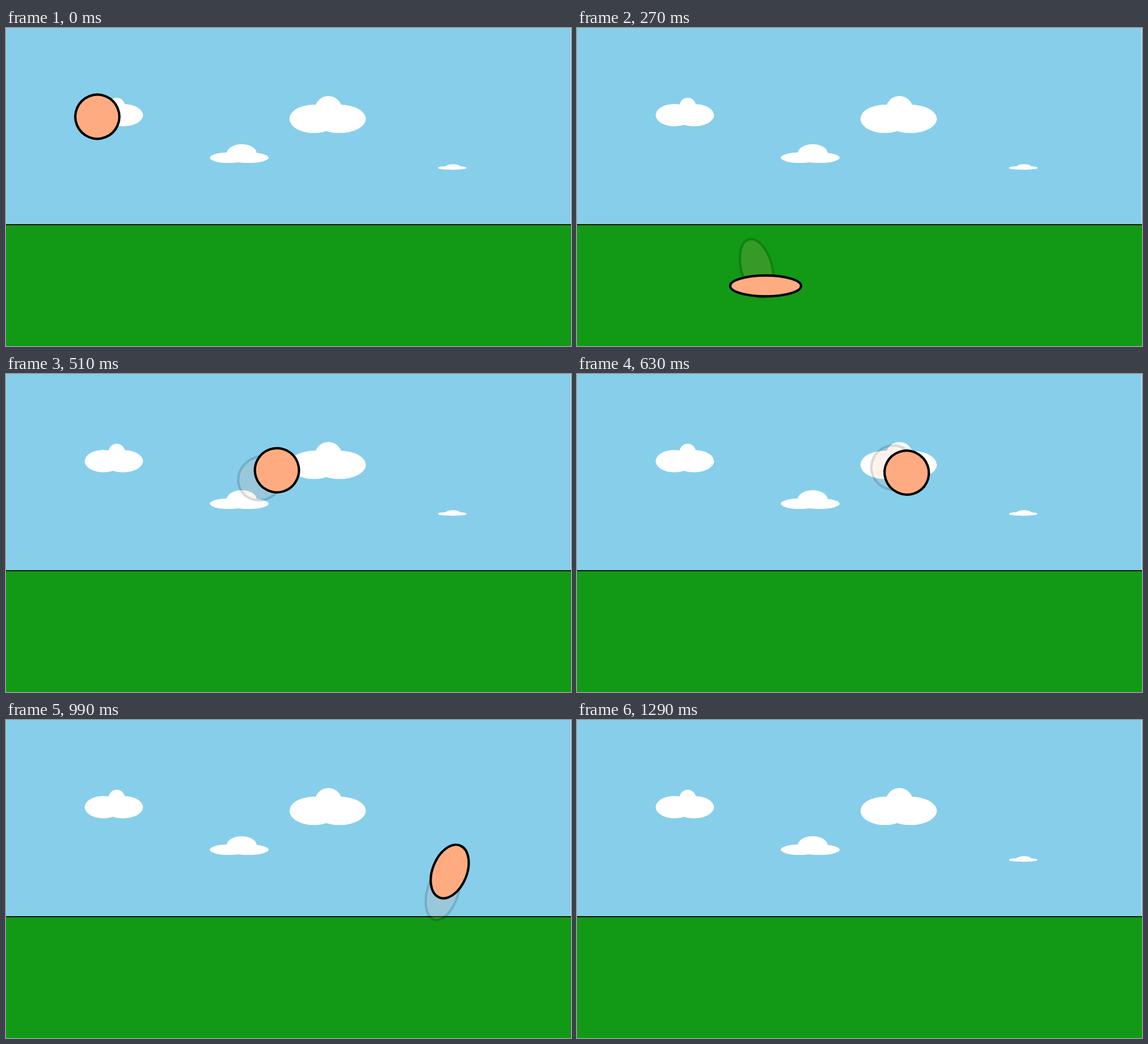
Recreate the animation shown at these times as an HTML page. Size 998 by 561 pixels, loop 1500 ms.

```html
<!DOCTYPE html>
<html lang="en">
<head>
<meta charset="utf-8">
<title>Bouncing ball</title>
<style>
  html, body { margin: 0; width: 100%; height: 100%; overflow: hidden; background: #fff; }
  svg { display: block; width: 998px; height: 561px; }
</style>
</head>
<body>
<svg viewBox="0 0 998 561">
  <rect width="997.5" height="347" fill="#87ceeb"/>
  <rect y="347" width="998" height="214" fill="#129916"/>
  <path d="M0 346.8H998" stroke="#000" stroke-width="1.8"/>
  <g id="clouds" fill="#fff"></g>
  <g fill="#ffab81" stroke="#000" stroke-width="4.2">
    <ellipse id="trail" opacity=".15"/>
    <ellipse id="ball"/>
  </g>
</svg>
<script>
const LOOP = 1500, STEP = 30, STROKE = 4.2, RADIUS = 41, LAST = 42;
const $ = id => document.getElementById(id);

const puff = (cx, cy, rx, ry) =>
  `<ellipse cx="${cx}" cy="${cy}" rx="${rx}" ry="${ry}"/>`;

// Two overlapping puffs side by side with a third as the head
function cloud(left, y, width, height, ...head) {
  const a = width * 0.32, b = width * 0.345;
  $('clouds').innerHTML += puff(left + a, y, a, height) +
    puff(left + width - b, y, b, height) + puff(...head);
}
cloud(139, 153.8, 103, 19.7, 195.5, 137.5, 14.5, 14.5);
cloud(500.7, 160.3, 135, 25, 569.5, 144, 24, 24);
cloud(360, 228.8, 104, 9.3, 416.3, 221, 26.5, 16);
cloud(763, 246.7, 50.5, 3, 789.5, 245.2, 13.5, 5);

// Bezier control points of each flight; the second rise repeats the first
const rise = [[362, 370], [385, 276], [410, 167], [514, 164]];
const flights = [
  { start: 0, end: 8, points: [[161.3, 156.5], [224, 183], [280, 285], [317.4, 424]] },
  { start: 10, end: 18, points: rise },
  { start: 18, end: 28, points: [[514, 164], [584, 147], [686, 223], [700, 400]] },
  { start: 30, end: 38, points: rise.map(([x, y]) => [x + 391, y + 3]) },
  { start: 38, end: LAST, points: [[905, 167], [957, 167], [1009, 167], [1061, 167]] }
];
const impacts = { 9: [333.2, 455], 29: [724, 430] };

const mix = (p, q, u) => p.map((v, i) => v + (q[i] - v) * u);

function pose(step) {
  if (impacts[step]) {
    const [x, y] = impacts[step];
    return { x, y, rx: 64.7, ry: 20.5, tilt: 0 };
  }
  const { start, end, points: [a, b, c, d] } = flights.find(f => step <= f.end);
  const u = (step - start) / (end - start);
  const bc = mix(b, c, u);
  const from = mix(mix(a, b, u), bc, u), to = mix(bc, mix(c, d, u), u);
  const [x, y] = mix(from, to, u);
  // The ball stretches along its path as it nears the ground
  const stretch = Math.min(1, Math.max(0, (y - 170) / 130));
  const tilt = Math.atan2(to[0] - from[0], from[1] - to[1]) * 180 / Math.PI;
  return { x, y, rx: RADIUS - 11.5 * stretch, ry: RADIUS + 14 * stretch, tilt };
}

function place(el, step) {
  const { x, y, rx, ry, tilt } = pose(step);
  el.setAttribute('rx', rx - STROKE / 2);
  el.setAttribute('ry', ry - STROKE / 2);
  el.setAttribute('transform', `translate(${x} ${y}) rotate(${tilt})`);
}

function draw() {
  const step = Math.floor((performance.now() % LOOP) / STEP + 1e-6);
  place($('ball'), Math.min(step, LAST));
  place($('trail'), step ? Math.min(step - 1, LAST) : LAST);
  requestAnimationFrame(draw);
}
draw();
</script>
</body>
</html>
```
